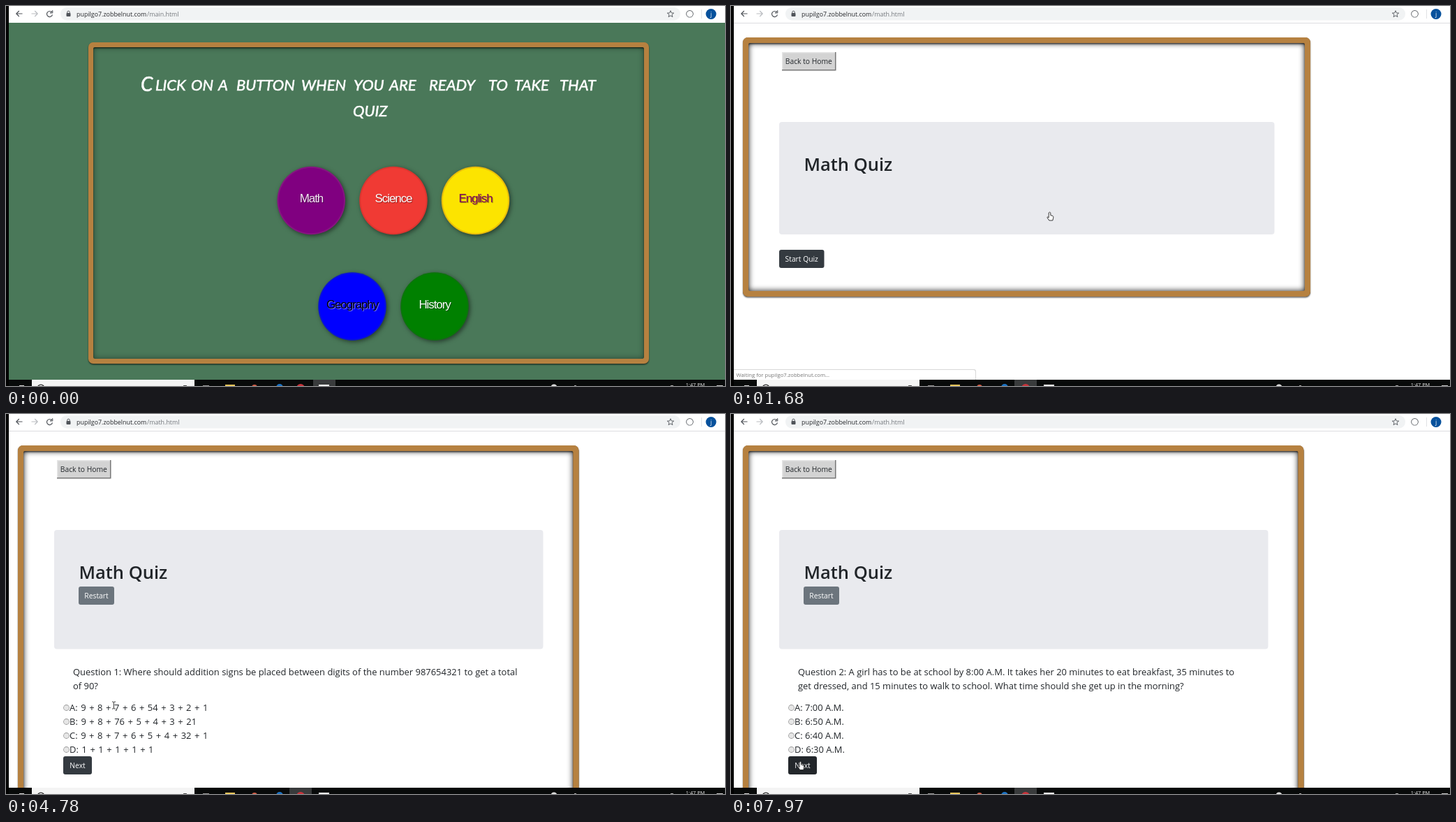
Recreate the animation shown at these times as an HTML page with a canvas. Size 1030 by 544 pixels, loop 8 s.

```html
<!DOCTYPE html>
<html lang="en">
<head>
<meta charset="utf-8">
<title>Quiz walkthrough</title>
<style>
html, body { margin: 0; width: 100%; height: 100%; overflow: hidden; background: #fff; }
canvas { display: block; }
</style>
</head>
<body>
<canvas id="stage" width="1030" height="544"></canvas>
<script>
const ctx = document.getElementById('stage').getContext('2d');
const LOOP = 8000;
const OPEN = '"Open Sans", sans-serif';
const ARIAL = '"Liberation Sans", sans-serif';
const HOST = 'pupilgo7.zobbelnut.com';
const BROWN = '#b68140';

const clamp = v => Math.max(0, Math.min(1, v));
const ease = v => { v = clamp(v); return v * v * (3 - 2 * v); };
const mix = (a, b, k) => a + (b - a) * k;

function isolate(draw) { ctx.save(); draw(); ctx.restore(); }

function text(s, x, y, size, color, { font = OPEN, style = '', align = 'left', letter = 0, word = 0 } = {}) {
  ctx.font = `${style} ${size}px ${font}`;
  ctx.textAlign = align;
  ctx.letterSpacing = letter + 'px';
  ctx.wordSpacing = word + 'px';
  ctx.fillStyle = color;
  ctx.fillText(s, x, y);
}

function rect(x, y, w, h, color, r = 0) {
  ctx.fillStyle = color;
  ctx.beginPath();
  ctx.roundRect(x, y, w, h, r);
  ctx.fill();
}

function circle(x, y, r, color) {
  ctx.fillStyle = color;
  ctx.beginPath();
  ctx.arc(x, y, r, 0, 7);
  ctx.fill();
}

function line(path, color, width = 1.2) {
  ctx.strokeStyle = color;
  ctx.lineWidth = width;
  ctx.stroke(new Path2D(path));
}

function shadow(color, blur, x = 0, y = 0) {
  ctx.shadowColor = color;
  ctx.shadowBlur = blur;
  ctx.shadowOffsetX = x;
  ctx.shadowOffsetY = y;
}

// Wooden frame with a shadow falling inwards and a thin one outside
function frame(x, y, w, h, thick, depth) {
  const ring = new Path2D();
  ring.roundRect(x, y, w, h, 7);
  ring.roundRect(x + thick, y + thick, w - 2 * thick, h - 2 * thick, 2);
  ctx.fillStyle = BROWN;
  isolate(() => {
    ctx.beginPath();
    ctx.roundRect(x, y, w, h, 7);
    ctx.clip();
    shadow(`rgba(0,0,0,${depth})`, 9);
    ctx.fill(ring, 'evenodd');
  });
  isolate(() => {
    shadow('rgba(0,0,0,.6)', 2, 0, 1.5);
    ctx.fill(ring, 'evenodd');
  });
}

function button(label, x, y, w, color) {
  rect(x, y, w, 26, color, 3);
  text(label, x + w / 2, y + 17, 10.3, '#fff', { align: 'center' });
}

// --- Menu page ---
const TITLE = [['lick', 214], ['on', 265], ['a', 304], ['button', 330], ['when', 423], ['you', 498],
  ['are', 549], ['ready', 606], ['to', 691], ['take', 728], ['that', 793], ['quiz', 497, 158]];
const TOPICS = [
  ['Science', 555, 278.5, '#f03a34', '#dc3630', '#fff'],
  ['English', 672.5, 278.5, '#fce400', '#e9bd0b', '#800060'],
  ['Geography', 496, 430, '#0000ff', '#0812d8', '#000'],
  ['History', 614, 430, '#008000', '#0a760a', '#fff']
];

function disc(x, y, r, fill, edge) {
  isolate(() => {
    shadow('rgba(0,0,0,.5)', 6, 2, 2);
    circle(x, y, r, edge);
  });
  circle(x, y, r - 2, fill);
}

function topicLabel(s, x, y, color) {
  isolate(() => {
    shadow(color === '#000' ? 'rgba(255,255,255,.5)' : 'rgba(0,0,0,.4)', 1, 1, 1);
    text(s, x, y, 17, color, { font: ARIAL, align: 'center', letter: -1.1 });
  });
}

function mathTopic(t) {
  const grow = ease((t - 840) / 130);
  const r = mix(48.75, 53, grow);
  disc(388.5 + r, 229.7 + r, r, '#800080', grow ? '#800080' : '#861580');
  if (!grow) return topicLabel('Math', 437.5, 281, '#f4e8f4');
  text('Math', mix(437.5, 442.5, grow), mix(281, 276, grow), mix(17, 21, grow), '#800080',
    { font: ARIAL, align: 'center', letter: -1 });
  ctx.strokeStyle = 'rgba(205,150,205,.6)';
  ctx.lineWidth = .7;
  ctx.strokeText('Math', mix(437.5, 442.5, grow), mix(281, 276, grow));
}

function menuPage(t) {
  rect(4, 24, 1026, 511, '#4a7859');
  frame(118, 52, 803, 460, 7, .45);
  const hand = { font: 'Lato, sans-serif', style: 'italic' };
  text('C', 193, 122, 28, '#fff', hand);
  ctx.lineWidth = .6;
  ctx.strokeStyle = '#fff';
  ctx.strokeText('C', 193, 122);
  for (const [word, x, y = 121] of TITLE) {
    text(word.toUpperCase(), x, y, 22, '#fff', hand);
    ctx.strokeText(word.toUpperCase(), x, y);
  }
  for (const [name, x, y, fill, edge, ink] of TOPICS) {
    disc(x, y, 48.75, fill, edge);
    topicLabel(name, x, y + 2.5, ink);
  }
  mathTopic(t);
  const fade = ease((t - 900) / 490);
  if (fade) isolate(() => {
    ctx.globalAlpha = fade;
    isolate(() => {
      shadow('rgba(0,0,0,.35)', 6, 2, 3);
      circle(470, 318.5, 68, 'rgba(173,92,234,.82)');
    });
    text('Get your calculator ready.', 470, 301, 9.3, '#fff', { font: ARIAL, align: 'center', letter: -.64 });
  });
  if (t >= 1210) {
    rect(4, 521, 162, 14, '#dee1e6', [0, 3, 0, 0]);
    text(`https://${HOST}/math.html`, 7.5, 531, 7.67, '#666');
  }
}

// --- Quiz page ---
const QUESTIONS = [
  {
    lines: ['Question 1: Where should addition signs be placed between digits of the number 987654321 to get a total', 'of 90?'],
    answers: ['9 + 8 + 7 + 6 + 54 + 3 + 2 + 1', '9 + 8 + 76 + 5 + 4 + 3 + 21', '9 + 8 + 7 + 6 + 5 + 4 + 32 + 1', '1 + 1 + 1 + 1 + 1'],
    word: 1.2
  },
  {
    lines: ['Question 2: A girl has to be at school by 8:00 A.M. It takes her 20 minutes to eat breakfast, 35 minutes to',
      'get dressed, and 15 minutes to walk to school. What time should she get up in the morning?'],
    answers: ['7:00 A.M.', '6:50 A.M.', '6:40 A.M.', '6:30 A.M.'],
    word: 0
  }
];

function radio(x, y, checked) {
  circle(x, y, 4.4, '#9a9a9a');
  circle(x, y, 3.6, '#e6e6e6');
  if (checked) circle(x, y, 2, '#444');
}

function question(t) {
  const { lines, answers, word } = QUESTIONS[t < 7290 ? 0 : 1];
  lines.forEach((s, i) => text(s, 96, 374 + 20 * i, 12.95, '#212529'));
  answers.forEach((s, i) => {
    const y = 420.5 + 20 * i;
    radio(86.5, y, i === 0 && t >= 6330 && t < 7290);
    text(`${'ABCD'[i]}: ${s}`, 91, y + 4.5, 12.95, '#212529', { word });
  });
  button('Next', 82, 490, 41, t > 6950 ? '#23272b' : '#343a40');
}

function quizPage(t) {
  const started = t >= 3080;
  rect(4, 24, 1026, 511, '#fff');
  rect(4, 24, 1026, 1, '#dcdde0');
  frame(17, 45, started ? 803.5 : 813, started ? 540 : 371, 8, .9);
  rect(73, 66, 77.5, 26.5, '#777');
  rect(73, 66, 76, 25, '#e4e4e4');
  rect(74.5, 67.5, 74.5, 23.5, '#d3d3d3');
  text('Back to Home', 111.3, 83, 10.3, '#212529', { align: 'center' });
  rect(69, 166, started ? 700.5 : 709.5, started ? 170.5 : 161, '#e9eaee', 4);
  text('Math Quiz', 104.5, 236, 25.5, '#212529', { style: '600' });
  if (started) {
    button('Restart', 104, 247, 51, '#6c757d');
    question(t);
  } else {
    button('Start Quiz', 69, 349, 64.5, t > 2650 ? '#23272b' : '#343a40');
  }
  if (t < 1990) {
    rect(4, 520, 347, 15, '#d8d8d8', [0, 3, 0, 0]);
    rect(4, 521, 346, 14, '#fff', [0, 3, 0, 0]);
    text(`Waiting for ${HOST}...`, 7.5, 531, 7.67, '#777');
  }
}

// --- Browser bar and taskbar ---
function toolbar(t) {
  const ink = '#50545a';
  rect(0, 0, 1030, 24, '#fff');
  rect(78, 2, 888, 18.5, '#f1f3f4', 9);
  line('M23.5 11H15M18.8 7L14.8 11L18.8 15', ink);
  line('M36.5 11H45M41.2 7L45.2 11L41.2 15', '#b9bcc0');
  if (t >= 1210 && t < 1680) line('M58.8 7.5L66 14.7M66 7.5L58.8 14.7', ink);
  else {
    line('M65.6 9A4 4 0 1 0 66.4 12.3', ink);
    line('M66.8 6.5V10H63.2Z', ink, 1);
  }
  rect(86.5, 10, 6, 5, ink, 1);
  line('M87.8 10V8.8A1.7 1.7 0 0 1 91.2 8.8V10', ink, 1);
  text(HOST, 101, 14.5, 8.9, '#26282c');
  text(t < 1310 ? '/main.html' : '/math.html', 202, 14.5, 8.9, '#74787d');
  line('M952 6.7L953.3 9.9L956.7 10.1L954 12.3L954.9 15.6L952 13.8L949.1 15.6L950 12.3L947.3 10.1L950.7 9.9Z', ink, .9);
  circle(979.5, 11.3, 5.3, '#5f6368');
  circle(979.5, 11.3, 4.4, '#fff');
  rect(996, 5, 1, 13, '#e0e2e5');
  circle(1010, 11.5, 7.5, '#07519c');
  text('j', 1010, 14.5, 8.5, '#fff', { align: 'center' });
}

function taskbar(t) {
  rect(0, 535, 1030, 9, '#080a0a');
  rect(37, 535, 233, 9, '#f4f4f4');
  rect(t < 1210 ? 440 : 406, 535, 32, 9, '#393b3c');
  circle(50, 547, 5.5, '#222');
  circle(50, 547, 4.3, '#f4f4f4');
  rect(254, 543, 5, 1, '#444', 1);
  rect(19, 543, 7, 1, '#ddd');
  rect(282, 543, 9, 1, '#999');
  rect(314, 542, 14, 2, '#e8c65c');
  circle(356, 546, 4, '#d8604a');
  circle(392, 546, 5, '#1d73c4');
  circle(422, 547, 6, '#c9343c');
  rect(448, 542, 15, 2, '#eee');
  circle(785, 546, 4.5, '#ddd');
  rect(814, 543, 3, 1, '#aaa');
  rect(952, 543, 4, 1, '#aaa');
  text('1:47 PM', 987.5, 544.5, 7.3, '#eee', { align: 'center' });
  rect(1018, 543, 9, 1, '#ccc');
  rect(0, 0, 4, 544, '#000');
}

// --- Pointer ---
const SHAPES = {
  arrow: new Path2D('M0 0V10.5L2.4 8.3L4 12L5.6 11.3L4 7.7H7.3Z'),
  hand: new Path2D('M-1.3 1Q0 -.8 1.3 1V4.6L4.4 5.4Q5.6 6 5.2 8.5L4.3 12H-.7L-3.7 7.6Q-3.4 6 -1.3 8Z'),
  beam: new Path2D('M-2.5 -5H-.6L0 -4.4L.6 -5H2.5M0 -4.4V4.4M-2.5 5H-.6L0 4.4L.6 5H2.5')
};
// time, x, y, shape
const PATH = [
  [530, 783, 400, 'arrow'], [890, 456.5, 295, 'hand'], [1990, 456.5, 295, 'hand'],
  [2200, 425, 281, 'arrow'], [2690, 95, 366, 'hand'], [2850, 92, 368, 'hand'],
  [3080, 92, 368, 'arrow'], [3560, 92, 368, 'arrow'], [3570, 100, 374, 'beam'],
  [4090, 108, 424, 'beam'], [4240, 108, 422, 'beam'], [4500, 78, 402, 'arrow'],
  [4640, 92, 417, 'beam'], [5020, 293, 417, 'arrow'], [5100, 293, 417, 'beam'],
  [5400, 190, 446, 'beam'], [5710, 81, 424, 'arrow'], [6030, 81, 425, 'arrow'],
  [6300, 86, 420, 'arrow'], [6590, 86, 420, 'arrow'], [6960, 97, 497, 'hand'],
  [7360, 97, 497, 'hand'], [7900, 97, 497, 'hand'], [7970, 99.5, 497.5, 'hand']
];

function pointer(t) {
  const i = PATH.findLastIndex(p => p[0] <= t);
  if (i < 0) return;
  const a = PATH[i], b = PATH[i + 1] || a;
  const k = a === b ? 0 : ease((t - a[0]) / (b[0] - a[0]));
  isolate(() => {
    ctx.translate(mix(a[1], b[1], k), mix(a[2], b[2], k));
    ctx.strokeStyle = '#222';
    ctx.lineWidth = .9;
    if (a[3] !== 'beam') {
      ctx.fillStyle = '#fff';
      ctx.fill(SHAPES[a[3]]);
    }
    ctx.stroke(SHAPES[a[3]]);
  });
}

function draw(now) {
  const t = now % LOOP;
  if (t < 1680) menuPage(t);
  else quizPage(t);
  toolbar(t);
  taskbar(t);
  pointer(t);
  requestAnimationFrame(draw);
}
requestAnimationFrame(draw);
</script>
</body>
</html>
```
